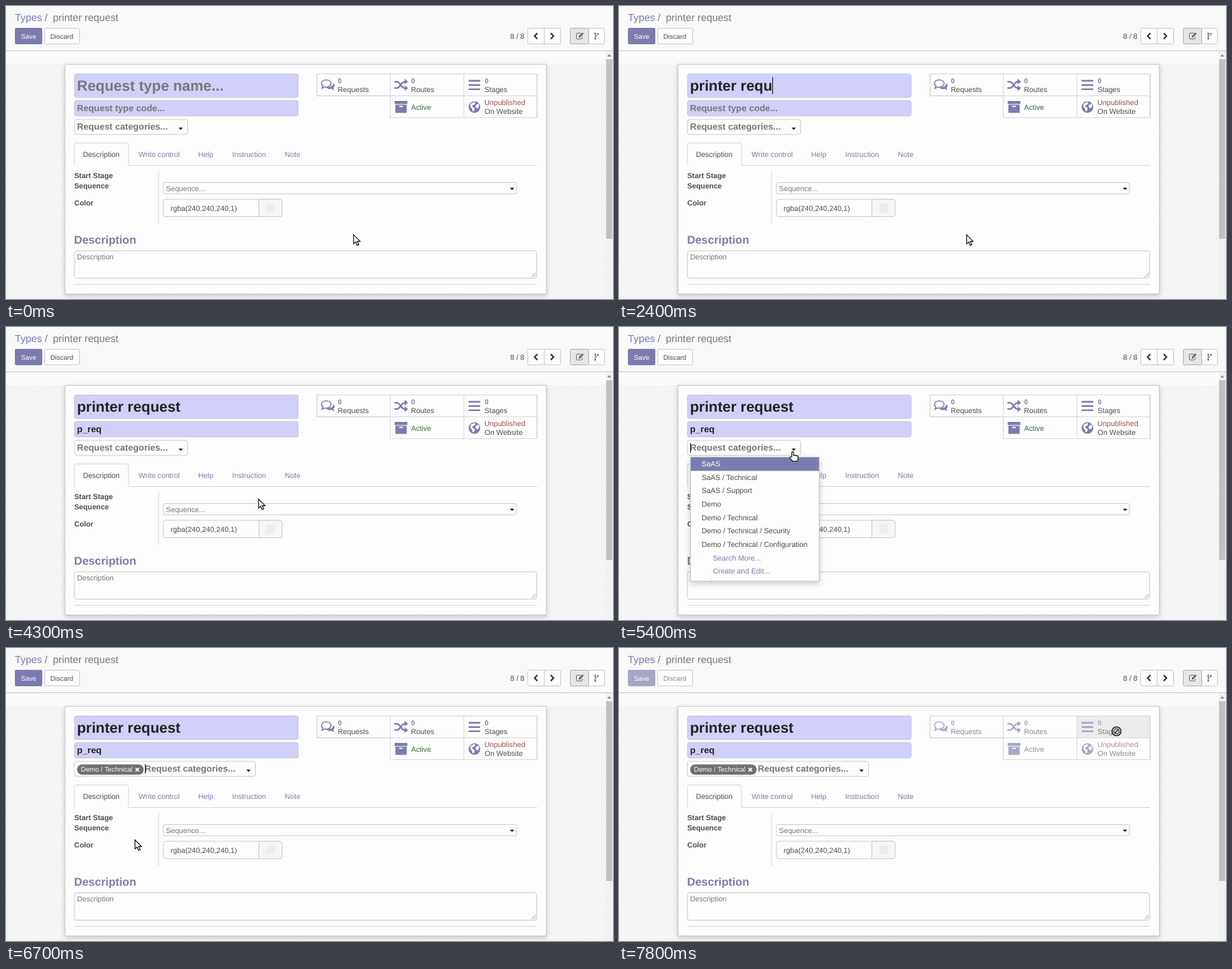
Recreate the animation shown at these times as an HTML page. Size 887x429 px, loop 8000 ms.

```html
<!DOCTYPE html>
<html lang="en">
<head>
<meta charset="utf-8">
<title>Request type form</title>
<style>
  html, body { margin: 0; width: 100%; height: 100%; overflow: hidden; background: #fff; }
  svg { display: block; width: 887px; height: 429px; }
  text { font: 10.73px "Liberation Sans", Arial, sans-serif; fill: #4c4c4c; text-rendering: geometricPrecision; white-space: pre; }
  .title { font-size: 14.85px; fill: #777; }
  .small { font-size: 9.9px; }
  .bold { font-weight: bold; }
  .name { font-size: 21.45px; font-weight: bold; }
  .field { font-size: 13.2px; font-weight: bold; }
  .heading { font-size: 16.5px; font-weight: bold; }
  .link { fill: #7c7bad; }
  .hint { fill: #777; }
  .typed { fill: #222; }
  .white { fill: #fff; }
  .active { fill: #3e6442; }
  .danger { fill: #a24c4c; }
  .box { fill: #fdfdfd; stroke: #ccc; }
  .required { fill: #d1d0fa; stroke: #c6c6dc; }
  .rule { fill: none; stroke: #d8d8d8; }
  .icon { fill: #7c7bad; }
  .line { fill: none; stroke: #7c7bad; }
  .sheet { fill: #fdfdfd; stroke: #cdcdd3; filter: drop-shadow(0 2px 3px rgba(0, 0, 0, .2)); }
  .menu { fill: #fdfdfd; stroke: #c4c4c4; filter: drop-shadow(0 3px 4px rgba(0, 0, 0, .22)); }
  .caret { fill: #111; }
</style>
</head>
<body>
<svg viewBox="0 0 887 429">
  <defs>
    <pattern id="dots" width="3.3" height="3.3" patternUnits="userSpaceOnUse">
      <path fill="#fbfbfb" d="M0 0h3.3v3.3H0z"/>
      <path fill="#ededed" d="M0 0h1.65v1.65H0zM1.65 1.65h1.65v1.65H1.65z"/>
    </pattern>
    <path id="drop" d="M-3.2-1.5h6.4L0 2z" fill="#222"/>
  </defs>

  <!-- Header -->
  <path fill="#f9f9f9" d="M0 0h887v65H0z"/>
  <path fill="#fafafa" d="M0 66h877v19H0z"/>
  <path fill="url(#dots)" d="M0 85h877v344H0z"/>
  <path fill="#c9c9c9" d="M0 65h887v1H0z"/>
  <text class="title" x="13" y="22"><tspan class="link">Types</tspan></text>
  <text class="title" x="56.5" y="22">/</text>
  <text class="title" x="68.5" y="22">printer request</text>
  <g class="busy">
    <rect x="13" y="32" width="40" height="24" rx="2" fill="#7c7bad"/>
    <text class="small white" x="21.7" y="47.5">Save</text>
  </g>
  <rect class="box" x="56.5" y="32.5" width="51" height="23" rx="2"/>
  <text class="small busy" x="64.7" y="47.5">Discard</text>
  <text x="736.7" y="47.7">8 / 8</text>
  <path class="box" d="M764.5 32.5h44a2 2 0 0 1 2 2v19a2 2 0 0 1-2 2h-44a2 2 0 0 1-2-2v-19a2 2 0 0 1 2-2zM786.5 32.5v23"/>
  <path d="M776.5 39.8l-4 4.2 4 4.2M796 39.8l4 4.2-4 4.2" fill="none" stroke="#333" stroke-width="2.2"/>
  <rect class="box" x="851" y="32.5" width="23.5" height="23" rx="2"/>
  <rect x="824.5" y="32.5" width="27" height="23" rx="2" fill="#e6e6e6" stroke="#b0b0b0"/>
  <path d="M840.5 39.8H835a1.5 1.5 0 0 0-1.5 1.5v5.4a1.5 1.5 0 0 0 1.5 1.5h5.6a1.5 1.5 0 0 0 1.5-1.5V45" fill="none" stroke="#666"/>
  <path d="M837 46v-2l5.4-5.2 1.7 1.8-5.1 5.4z" fill="#666"/>
  <g fill="none" stroke="#666">
    <path d="M861 40v8M865 40.5c0 3.5-4 2-4 5"/>
    <path d="M861 40.2h.1M861 48h.1M865 40.6h.1" stroke-width="2.4" stroke-linecap="round"/>
  </g>

  <!-- Scrollbar -->
  <path fill="#f1f1f1" d="M876 66h11v363h-11z"/>
  <path fill="#c1c1c1" d="M877 78h9v263h-9z"/>
  <path fill="#8a8a8a" d="M878.5 74l3-3.5 3 3.5z"/>

  <!-- Sheet -->
  <rect class="sheet" x="86.5" y="85.5" width="703" height="336"/>
  <rect class="required" x="100" y="99.5" width="327" height="34.5" rx="3"/>
  <rect class="required" x="100" y="138.5" width="327" height="22.5" rx="3"/>
  <text class="name" id="name" x="103.7" y="124"></text>
  <text class="field" id="code" x="103.7" y="154"></text>
  <rect class="box" id="category" x="100" y="166" height="22" rx="3"/>
  <g id="tag">
    <rect x="104" y="170.5" width="97" height="15" rx="7" fill="#6f6f6f"/>
    <text class="small white" x="109.5" y="181.3">Demo / Technical</text>
    <path d="M189.4 175.6l5 5m0-5l-5 5" stroke="#fff" stroke-width="1.9"/>
  </g>
  <text class="field hint" id="categoryHint" y="181">Request categories...</text>
  <use href="#drop" id="categoryDrop" y="179.5"/>

  <!-- Stat buttons -->
  <path class="box" d="M454.5 99.5H776v64H561.5v-32h-107z"/>
  <rect id="hover" x="669" y="99.5" width="107" height="32" fill="#ebebeb"/>
  <path class="rule" d="M454.5 99.5H776v64H561.5v-64M561.5 131.5H776M669 99.5v64"/>
  <g class="busy">
    <path class="icon" d="M472 118.5c4 0 6-2 6.3-5.5 2.4 1.5 2.4 5 0 6.8l1.5 3.7-4-2.2c-3 .8-6 .2-7.5-1.8z"/>
    <path d="M468 108.2c4.2 0 7 2.3 7 5.2s-2.800 5.300-7 5.300q-1.200 0-2.200-.2l-4 2 1.300-3.500c-1.300-1-2-2.200-2-3.600 0-2.900 2.800-5.200 6.900-5.200z" fill="#fff" stroke="#7c7bad" stroke-width="1.6"/>
    <path class="line" stroke-width="2.3" d="M567.5 110.8h3.5c5 0 6.500 9.400 11.500 9.400h1M567.5 120.2h3.500c5 0 6.500-9.400 11.500-9.400h1"/>
    <path class="icon" d="M582.5 106.5l5 4.3-5 4.3zM582.5 115.900l5 4.300-5 4.300z"/>
    <path class="icon" d="M676 108.300h17v2.400h-17zM676 114.500h17v2.400h-17zM676 120.700h17v2.400h-17z"/>
    <path class="icon" d="M568 139h18.5v4.5H568zM569 144.5h16.5v12H569z"/>
    <path d="M574.5 147h5.5" stroke="#fff" stroke-width="1.6"/>
    <circle class="icon" cx="684.5" cy="148" r="8.5"/>
    <path fill="#fff" d="M679 143l5-2.500 2 1.500-2 2.500-3 1.500 1 2 3 1.500-1 4-2 1-1-4-2.500-3zM688 144l2.500-1 1 3-2 4-2.500-1-1-3z"/>
    <text class="small bold link" x="485" y="113">0</text>
    <text class="small bold link" x="592" y="113">0</text>
    <text class="small bold link" x="699.5" y="113">0</text>
    <text x="484.8" y="125.6">Requests</text>
    <text x="591.8" y="125.6">Routes</text>
    <text x="699.3" y="125.6">Stages</text>
    <text class="active" x="592" y="151.7">Active</text>
    <text class="danger" x="699" y="145.3">Unpublished</text>
    <text x="699.3" y="157.6">On Website</text>
  </g>

  <!-- Notebook -->
  <path class="rule" d="M100 233.5v-30a3 3 0 0 1 3-3h73a3 3 0 0 1 3 3v30h597"/>
  <text x="112.4" y="220.5">Description</text>
  <text class="link" x="193.8" y="220.5">Write control</text>
  <text class="link" x="280.8" y="220.5">Help</text>
  <text class="link" x="330.5" y="220.5">Instruction</text>
  <text class="link" x="407.5" y="220.5">Note</text>
  <text class="bold" x="99.7" y="252.3">Start Stage</text>
  <text class="bold" x="99.7" y="267.3">Sequence</text>
  <text class="bold" x="99.7" y="291.5">Color</text>
  <path class="rule" d="M223 241v78"/>
  <rect class="box" x="230" y="258.5" width="516" height="16.5" rx="2.5"/>
  <text class="hint" x="233.8" y="270.7">Sequence...</text>
  <use href="#drop" x="739.5" y="267.5"/>
  <rect class="box" x="230" y="283" width="173" height="25.5" rx="3"/>
  <path fill="#f5f5f5" stroke="#ccc" d="M369.5 283h31a3 3 0 0 1 3 3v19.5a3 3 0 0 1-3 3h-31z"/>
  <path fill="#eceeec" d="M380 289h13v13h-13z"/>
  <text x="240.5" y="299.8">rgba(240,240,240,1)</text>
  <text class="heading link" x="99.5" y="348">Description</text>
  <rect class="box" x="100" y="358.5" width="675.5" height="40" rx="3"/>
  <text class="hint" x="103.7" y="371.3">Description</text>
  <path d="M768 397l6-6M771.500 397l2.500-2.500" stroke="#888" stroke-width=".8"/>
  <path class="rule" d="M100 407.5h676"/>

  <g id="menu">
    <rect class="menu" x="104.5" y="190.5" width="188" height="181.5"/>
    <rect id="choice" x="105" width="187" height="19.6" fill="#7c7bad"/>
  </g>
  <rect class="caret" id="caret" width="1"/>

  <!-- Pointers, each drawn from its hot spot -->
  <g id="pointer">
    <path data-kind="arrow" d="M0 0v13.2l3-2.7 2.3 5 2.3-1-2.3-4.9h4.200z" fill="#fff" stroke="#111" stroke-width="1.2"/>
    <path data-kind="hand" d="M-1.5 7V1a1.3 1.3 0 0 1 2.6 0v4q1.3-1 2.400.3 1.300-.8 2.200.4 1.800-.4 1.900 1.300v3.200l-1.300 3.300h-6.500L-4.300 9q-.5-2 1.200-1.700z" fill="#fff" stroke="#111" stroke-width="1.2"/>
    <g data-kind="blocked" fill="none" stroke="#222">
      <circle r="6.5" fill="#ddd" stroke-width="1.6"/>
      <circle r="3.8" stroke-width="1.1"/>
      <path d="M-2.700 2.700l5.400-5.400" stroke-width="1.4"/>
    </g>
  </g>
</svg>
<script>
const LOOP = 8000, STEP = 100, ROW = 19.65, MENU_TOP = 191;
const $ = id => document.getElementById(id);
const NAME = "printer request", CODE = "p_req";

// Times at which each next character has been typed
const nameKeys = [600, 800, 900, 1100, 1300, 1400, 1600, 1700, 1900, 2000, 2200, 2400, 2500, 2600, 2700];
const codeKeys = [2900, 3100, 3700, 3700, 3700];
const path = [
  [4000, 508, 335], [4300, 369, 252], [4600, 295, 203], [4900, 256, 185],
  [5400, 254, 183], [5700, 232, 215], [6100, 188.5, 281],
  [6700, 188.5, 281], [6900, 320, 243], [7200, 560, 172], [7500, 727, 122]
];
const options = ["SaAS", "SaAS / Technical", "SaAS / Support", "Demo", "Demo / Technical",
  "Demo / Technical / Security", "Demo / Technical / Configuration", "Search More...", "Create and Edit..."];

const rows = options.map((label, i) => {
  const row = document.createElementNS("http://www.w3.org/2000/svg", "text");
  row.textContent = label;
  row.setAttribute("x", i < 7 ? 120.7 : 137.2);
  row.setAttribute("y", MENU_TOP + ROW * i + 13);
  $("menu").append(row);
  return row;
});

const set = (id, attrs) => Object.entries(attrs).forEach(([key, value]) => $(id).setAttribute(key, value));
const show = (el, on) => { el.style.display = on ? "" : "none"; };
const typed = (word, keys, t) => word.slice(0, keys.filter(k => k <= t).length);

function mouseAt(t) {
  const next = path.findIndex(p => p[0] > t);
  if (next === 0) return path[0].slice(1);
  if (next < 0) return path.at(-1).slice(1);
  const [t0, x0, y0] = path[next - 1], [t1, x1, y1] = path[next];
  const k = (t - t0) / (t1 - t0);
  return [x0 + (x1 - x0) * k, y0 + (y1 - y0) * k];
}

function fill(id, value, hint, base) {
  const el = $(id);
  el.textContent = value || hint;
  el.setAttribute("class", `${base} ${value ? "typed" : "hint"}`);
  return value ? el.getComputedTextLength() : 0;
}

function render(t) {
  const nameWidth = fill("name", typed(NAME, nameKeys, t), "Request type name...", "name");
  const codeWidth = fill("code", typed(CODE, codeKeys, t), "Request type code...", "field");
  const tagged = t >= 6200, open = t >= 5400 && !tagged, busy = t >= 7700;
  const [x, y] = mouseAt(t);

  const shift = tagged ? 99 : 0;
  set("category", { width: 165.5 + shift });
  set("categoryHint", { x: 103.7 + shift });
  set("categoryDrop", { x: 255.3 + shift });
  show($("tag"), tagged);

  show($("menu"), open);
  const active = Math.max(0, Math.floor((y - MENU_TOP) / ROW));
  set("choice", { y: MENU_TOP + ROW * active });
  rows.forEach((row, i) => row.setAttribute("class", i === active ? "white" : i > 6 ? "link" : ""));

  const onStages = x > 669 && y < 131.5;
  show($("hover"), onStages);
  document.querySelectorAll(".busy").forEach(el => { el.style.opacity = busy ? .65 : 1; });

  let caret = null;
  if (t >= 500 && t < 2900) caret = [103.7 + nameWidth, 104, 25];
  else if (t >= 2900 && t < 4100) caret = [103.7 + codeWidth, 142, 15];
  else if (t >= 5000 && t < 7600) caret = [104 + shift, 170, 14];
  show($("caret"), caret);
  if (caret) set("caret", { x: caret[0], y: caret[1], height: caret[2] });

  const hand = onStages || (t >= 4900 && !tagged);
  const kind = busy ? "blocked" : hand ? "hand" : "arrow";
  set("pointer", { transform: `translate(${x} ${y})` });
  for (const el of $("pointer").children) show(el, el.dataset.kind === kind);
}

const start = performance.now();
function tick() {
  const t = (performance.now() - start) % LOOP;
  render(Math.floor(t / STEP) * STEP);
  requestAnimationFrame(tick);
}
tick();
</script>
</body>
</html>
```
